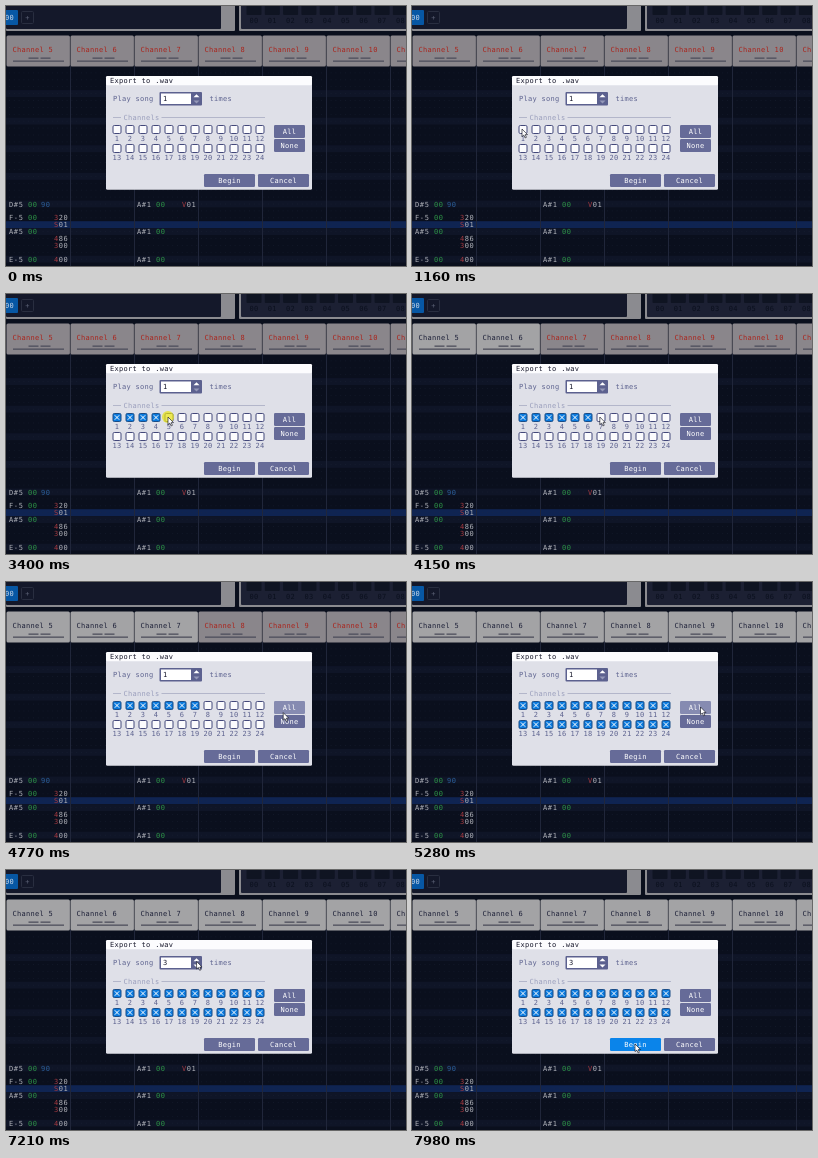
Animation of 400x260 px, one loop 8000 ms. Source, as an HTML page:

```html
<!DOCTYPE html>
<html lang="en">
<head>
<meta charset="utf-8">
<title>Export dialog</title>
<style>
html, body { margin: 0; width: 100%; height: 100%; overflow: hidden; background: #0a0f1d; }
svg { display: block; width: 100vw; height: 100vh; }
text {
  font: 7px "DejaVu Sans Mono", "Liberation Mono", monospace;
  letter-spacing: .3px;
  text-rendering: geometricPrecision;
  white-space: pre;
}
.mid { text-anchor: middle; }
.cell { letter-spacing: .6px; }
.head rect { fill: #8a868b; }
.head text { fill: #aa241c; }
.head.on rect { fill: #a3a3a5; }
.head.on text { fill: #1d2038; }
.head .bar { fill: #4e4f5c !important; }
.box rect { fill: #fbfbfd; stroke: #43487a; }
.box path { fill: none; stroke: #fff; visibility: hidden; }
.box.on rect { fill: #0a7ade; stroke: #1b4c86; }
.box.on path { visibility: visible; }
.btn rect { fill: #666b98; }
.btn text { fill: #fff; }
.btn.hover rect { fill: #868bb1; }
.btn.down rect { fill: #0a84ea; }
</style>
</head>
<body>
<svg id="stage" viewBox="0 0 400 260" preserveAspectRatio="none"></svg>
<script>
const LOOP = 8000;
const stage = document.getElementById('stage');

function add(parent, tag, attrs, content) {
  const el = document.createElementNS('http://www.w3.org/2000/svg', tag);
  for (const k in attrs) el.setAttribute(k, attrs[k]);
  if (content !== undefined) el.textContent = content;
  parent.appendChild(el);
  return el;
}
const group = cls => add(stage, 'g', { class: cls });
const rect = (p, x, y, width, height, fill, rx = 0) =>
  add(p, 'rect', { x, y, width, height, fill, rx });
const text = (p, x, y, str, fill, cls = '') =>
  add(p, 'text', { x, y, fill, class: cls }, str);

// Top panels
rect(stage, 0, -3, 229, 28, '#8b8b90', 1);
rect(stage, 0, -3, 215, 26, '#14182a', 1);
rect(stage, -3, 4, 15, 15, '#0757a4', 1);
text(stage, -1, 14, '00', '#cddaea');
add(stage, 'rect', { x: 15.5, y: 5.5, width: 12, height: 12, rx: 1, fill: '#14182a', stroke: '#292e40' });
text(stage, 21.5, 14, '+', '#5c6176', 'mid');
rect(stage, 233, -3, 170, 28, '#8b8b90', 1);
rect(stage, 235, -3, 168, 26, '#1c2033', 1);
for (let i = 0; i < 9; i++) {
  const x = 240.5 + i * 18.3;
  rect(stage, x, -2, 15, 11, '#0f1422', 1);
  text(stage, x + 7.5, 17, '0' + i, '#0b101e', 'mid');
}

// Pattern rows, a lighter band every fourth row
const ROW = 6.9;
const rowY = r => 198 + r * ROW;
for (let r = -19; r <= 8; r++) {
  const y = rowY(r);
  if (r % 4 === 0) rect(stage, 0, y - 3.5, 400, ROW, '#0f1527');
  if (r === 3) rect(stage, 0, y - 3.5, 400, ROW, '#0f2452');
  add(stage, 'line', { x1: 3, x2: 400, y1: y, y2: y, stroke: '#232a3f', 'stroke-width': .6, 'stroke-dasharray': '1 3.8', opacity: .6 });
}
for (let x = 64; x < 400; x += 64) rect(stage, x, 60, 1, 200, '#20263a');

const INK = '#b0b2b9', GREEN = '#2d9447', BLUE = '#2c609c', RED = '#a63a40';
const cell = (x, row, str, fill) => text(stage, x, rowY(row) + 2.6, str, fill, 'cell');
function note(x, row, name) {
  cell(x, row, name, INK);
  cell(x + 19, row, '00', GREEN);
}
function effect(x, row, code) {
  cell(x, row, code[0], RED);
  cell(x + 4.8, row, code.slice(1), INK);
}
note(3, 0, 'D#5');
cell(35, 0, '90', BLUE);
note(3, 2, 'F-5');
note(3, 4, 'A#5');
note(3, 8, 'E-5');
for (const row of [0, 4, 8]) note(131, row, 'A#1');
effect(176, 0, 'V01');
effect(48, 2, '320');
effect(48, 3, 'S01');
effect(48, 5, '486');
effect(48, 6, '300');
effect(48, 8, '400');

// Channel headers
const heads = [];
for (let n = 5; n <= 11; n++) {
  const x = (n - 5) * 64 + .5, g = group('head');
  const bar = (dx, y, w) => rect(g, x + dx, y, w, 1.3, '').classList.add('bar');
  rect(g, x, 29.5, 63.4, 31, '', 1.5);
  text(g, x + 6, 46, 'Channel ' + n);
  bar(22, 51.5, 10);
  bar(34, 51.5, 10);
  bar(6.5, 54.5, 51);
  heads[n] = g;
}

// Dialog
rect(stage, 100, 70, 206, 113.7, '#dfe0e8', 1.5);
rect(stage, 100, 70, 206, 9.3, '#fcfcfe', 1.5);
text(stage, 104, 77, 'Export to .wav', '#17182b');
text(stage, 107, 95, 'Play song', '#5d628f');
text(stage, 203.5, 95, 'times', '#5d628f');
rect(stage, 153.5, 86, 42.5, 13.5, '#5c618f', 1);
rect(stage, 155, 87.5, 30, 10.5, '#fff');
const count = text(stage, 157, 95, '1', '#17182b');
add(stage, 'path', { d: 'M187.5 91.2L190.5 88.2L193.5 91.2Z', fill: '#fff' });
const less = add(stage, 'path', { d: 'M187.5 94.4H193.5L190.5 97.4Z' });
rect(stage, 107, 111, 8, 1, '#b3b6ca');
text(stage, 117.5, 114, 'Channels', '#9a9ebc');
rect(stage, 155.5, 111, 103.5, 1, '#b3b6ca');

const boxes = [];
for (let n = 1; n <= 24; n++) {
  const x = 111 + (n - 1) % 12 * 13, y = n > 12 ? 142.5 : 123.5;
  const el = group('box');
  rect(el, x - 4, y - 4, 8, 8, '', 1.3);
  add(el, 'path', { d: `M${x - 2.2} ${y - 2.2}l4.4 4.4m0 -4.4l-4.4 4.4` });
  text(stage, x, y + 11.6, n, '#5d628f', 'mid');
  boxes[n] = el;
}

function button(x, y, w, label) {
  const el = group('btn');
  rect(el, x, y, w, 13, '', 1.3);
  text(el, x + w / 2, y + 9, label, '', 'mid');
  return { el, x, y, w };
}
const buttons = [
  button(268, 119, 31, 'All'),
  button(268, 133, 31, 'None'),
  button(198, 168, 51, 'Begin'),
  button(252, 168, 51, 'Cancel')
];

const flash = add(stage, 'circle', { r: 6, fill: '#e6e012', opacity: .72 });
const arrow = add(stage, 'path', {
  d: 'M0 0V7.6L1.8 6.1L3.1 8.9L4.4 8.3L3.2 5.6H5.5Z',
  fill: '#fff', stroke: '#10111c', 'stroke-width': .65, 'stroke-linejoin': 'round'
});

// Pointer script: move by a time, or click with a short rest around it
const HOLD = 100;
const stops = [], presses = [];
const go = (t, x, y) => stops.push({ t, x, y });
function click(t, x, y) {
  go(t - 50, x, y);
  presses.push(t);
  go(t + HOLD + 50, x, y);
}
const ENTER = 390, ALL = 5180, UP1 = 6610, UP2 = 6960, BEGIN = 7880;
const boxPress = [1210, 1810, 2380, 2800, 3400, 3750, 4220];

go(ENTER, 333, 249);
boxPress.forEach((t, i) => click(t, 110 + 13 * i, 123));
go(4520, 260, 139);
go(4640, 260, 139);
go(4870, 288.5, 125);
click(ALL, 288.5, 125);
go(5700, 288.5, 125);
go(5850, 282, 132);
go(6270, 172, 95);
go(6390, 177, 91);
click(UP1, 190, 90);
click(UP2, 190, 90);
go(7180, 190, 90);
go(7580, 223, 174);
click(BEGIN, 223, 174);

const ease = u => u * u * (3 - 2 * u);
function pointer(t) {
  const i = stops.findIndex(s => s.t > t);
  if (i < 1) return stops[0];
  const a = stops[i - 1], b = stops[i];
  const e = ease((t - a.t) / (b.t - a.t));
  return { x: a.x + (b.x - a.x) * e, y: a.y + (b.y - a.y) * e };
}

const isOn = (n, t) => t >= (boxPress[n - 1] || ALL) + HOLD;

function render(t) {
  const { x, y } = pointer(t), seen = t >= ENTER;
  const down = presses.some(p => t >= p && t < p + HOLD);

  boxes.forEach((b, n) => b.classList.toggle('on', isOn(n, t)));
  heads.forEach((h, n) => h.classList.toggle('on', isOn(n, t)));
  for (const b of buttons) {
    const over = seen && x >= b.x && x <= b.x + b.w && y >= b.y && y < b.y + 13;
    b.el.classList.toggle('hover', over);
    b.el.classList.toggle('down', over && (down || t >= BEGIN));
  }

  const times = 1 + (t >= UP1 + HOLD) + (t >= UP2 + HOLD);
  count.textContent = times;
  less.setAttribute('fill', times > 1 ? '#fff' : '#9498b8');
  flash.setAttribute('cx', x);
  flash.setAttribute('cy', y);
  flash.setAttribute('visibility', down ? 'visible' : 'hidden');
  arrow.setAttribute('transform', `translate(${x} ${y})`);
  arrow.setAttribute('visibility', seen ? 'visible' : 'hidden');
}

const start = performance.now();
function tick() {
  render((performance.now() - start) % LOOP);
  requestAnimationFrame(tick);
}
render(0);
requestAnimationFrame(tick);
</script>
</body>
</html>
```
